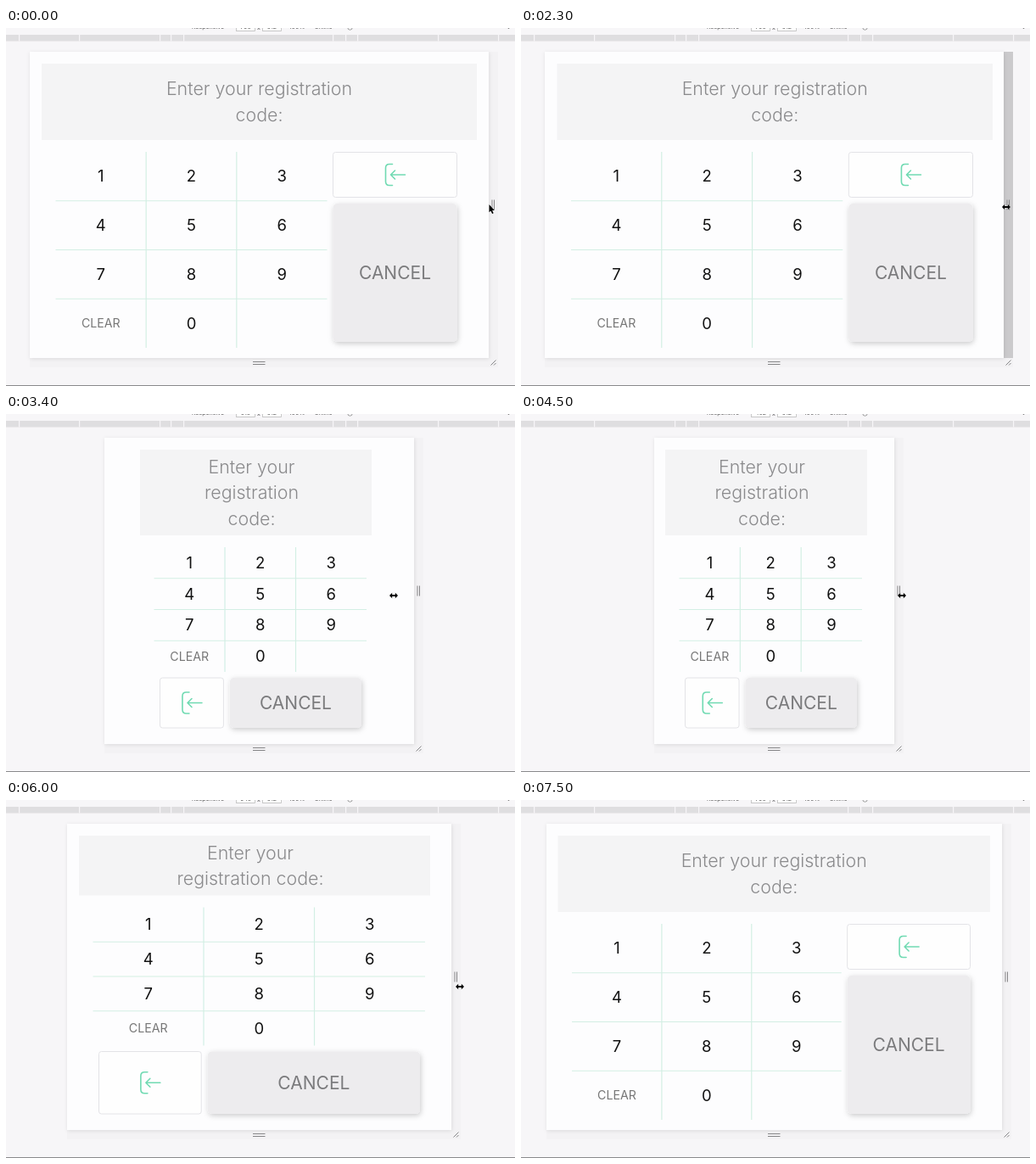
An HTML page for the animation above (8 s loop, 600 px wide and 422 px high).

```html
<!DOCTYPE html>
<html lang="en">
<head>
<meta charset="utf-8">
<title>Responsive keypad</title>
<style>
  html, body { margin: 0; height: 100%; overflow: hidden; background: #f7f6f8; }
  svg { display: block; width: 600px; height: 422px; font-family: Inter, "Open Sans", sans-serif; text-anchor: middle; }
  .title { font-size: 21.4px; font-weight: 300; fill: #8a8a8c; }
  .digit { font-size: 18.5px; fill: #111; }
  .clear { font-size: 14.2px; fill: #777; }
  .cancel { font-size: 21px; fill: #7b7b7d; }
  .bar { font-size: 7px; fill: #555; }
  .grid { stroke: #d3efe4; stroke-width: 1.2; fill: none; }
  .grip { stroke: #858587; fill: none; }
  .icon { stroke: #70dab2; stroke-width: 1.6; fill: none; stroke-linecap: round; stroke-linejoin: round; }
  .pointer { stroke: #fff; stroke-width: .8; paint-order: stroke; }
</style>
</head>
<body>
<svg id="stage" viewBox="0 0 600 422"></svg>
<script>
const LOOP = 8000, STEP = 100, MID = 298.5, TOP = 28, BOTTOM = 389;
const stage = document.getElementById('stage');

// [time, panel right, content left, content right, pointer x, pointer y]
const keys = [
  [0, 569, 42, 542, 569.5, 208],
  [400, 569, 42, 542, 569.5, 208],
  [700, 569, 42, 542, 577, 210],
  [900, 569, 42, 542, 577, 210],
  [1100, 569, 42, 542, 578, 209],
  [1500, 569, 42, 542, 578, 209],
  [2000, 569, 42, 542, 572, 211],
  [2200, 569, 42, 542, 572, 211],
  [2300, 569, 42.5, 543, 572, 211],
  [3100, 498, 122, 463, 489, 213],
  [3400, 481, 158, 431, 457, 214],
  [4000, 437, 173, 404, 445, 214],
  [4200, 437, 173, 404, 445, 214],
  [4500, 440, 170, 408, 449, 214],
  [5200, 477, 133.5, 446, 486, 217],
  [6000, 525, 86, 500, 535, 220],
  [6700, 563, 47, 536, 572, 219],
  [6900, 566, 44.5, 539, 574, 219],
  [7500, 567, 43.5, 540, 592, 214],
  [LOOP, 567, 43.5, 540, 592, 214]
];

const clamp = v => Math.max(0, Math.min(1, v));

function pose(t) {
  const i = keys.findIndex(k => k[0] > t), p = keys[i - 1], q = keys[i];
  const u = (t - p[0]) / (q[0] - p[0]);
  return p.map((v, j) => v + (q[j] - v) * u).slice(1);
}

const rect = (x, y, x2, y2, fill, more = '') =>
  `<rect x="${x}" y="${y}" width="${x2 - x}" height="${y2 - y}" fill="${fill}" ${more}/>`;
const text = (x, y, cls, s) => `<text x="${x}" y="${y}" class="${cls}">${s}</text>`;
const path = (d, cls, x = 0, y = 0) => `<path d="${d}" class="${cls}" transform="translate(${x} ${y})"/>`;
const shadow = (id, y, blur, alpha) =>
  `<filter id="${id}" x="-20%" y="-20%" width="140%" height="140%"><feDropShadow dx="${y / 2}" dy="${y}" stdDeviation="${blur}" flood-opacity="${alpha}"/></filter>`;

function toolbar(width) {
  const ticks = [15, 86, 181, 194, 209, 385, 400, 414, 509, 580];
  return rect(0, 8, 600, 15.5, '#dfdee0') +
    ticks.map(x => rect(x, 8, x + 1.2, 15.5, '#f7f6f8')).join('') +
    [271.5, 302.5].map(x => rect(x, -8, x + 22, 3.5, '#fff', 'stroke="#bbb" stroke-width=".8"')).join('') +
    text(238, 1.2, 'bar', 'Responsive') + text(282.5, 1.2, 'bar', width) + text(298, 2, 'bar', 'x') +
    text(313.5, 1.2, 'bar', 512) + text(343, 1.2, 'bar', '100%') + text(374, 1.2, 'bar', 'Online') +
    '<circle cx="405.5" cy="-.5" r="2.7" fill="none" stroke="#888" stroke-width=".8"/>' +
    '<circle cx="592.5" cy="0" r=".9" fill="#777"/>' +
    rect(0, 421, 600, 422, '#8a8a8c');
}

function frame(left, right, hover) {
  const mid = 295;
  return rect(left, TOP, right + 11, BOTTOM + 11, '#f3f2f4') +
    rect(right, TOP, right + 11, BOTTOM, '#cbcacc', `opacity="${hover}"`) +
    rect(left, TOP, right, BOTTOM, '#fdfdfe', 'filter="url(#soft)"') +
    path('M0 0v12M2.5 0v12', 'grip', right + 4, 202.5) +
    path(`M291 ${mid + 98.5}h14.5M291 ${mid + 101.5}h14.5`, 'grip') +
    path('M0 6l6-6M3.5 6l2.5-2.5', 'grip', right + 2.5, 391.5);
}

function keypad(x, y, w, h) {
  const cw = w / 3, rh = h / 4;
  let out = '', lines = '';
  for (let i = 1; i < 4; i++) {
    lines += `M${x} ${y + i * rh}h${w}`;
    if (i < 3) lines += `M${x + i * cw} ${y}v${h}`;
  }
  [1, 2, 3, 4, 5, 6, 7, 8, 9, 'CLEAR', 0].forEach((s, i) => {
    const word = s === 'CLEAR';
    out += text(x + (i % 3 + .5) * cw, y + (Math.floor(i / 3) + .5) * rh + (word ? 5 : 6.5), word ? 'clear' : 'digit', s);
  });
  return path(lines, 'grid') + out;
}

function buttons(enter, cancel) {
  const [x, y, x2, y2] = enter, [cx, cy, cx2, cy2] = cancel;
  return rect(x, y, x2, y2, '#fefefe', 'rx="3" stroke="#e3e3e7"') +
    path('M-3-12.5h-3.5q-4.5 0-4.5 4.5v16q0 4.5 4.5 4.5h3.5M12 0h-17M0-5l-5 5 5 5', 'icon', (x + x2) / 2, (y + y2) / 2) +
    rect(cx, cy, cx2, cy2, '#edecee', 'rx="5" filter="url(#lift)"') +
    text((cx + cx2) / 2, (cy + cy2) / 2 + 7.5, 'cancel', 'CANCEL');
}

function content(a, b, wide) {
  if (wide) b += 13;
  const lines = wide ? ['Enter your registration', 'code:']
    : b - a > 350 ? ['Enter your', 'registration code:']
    : ['Enter your', 'registration', 'code:'];
  const end = wide ? 132 : lines.length === 2 ? 112.5 : 143;
  const center = (a + b) / 2 - (wide ? 0 : 5);
  const title = lines.map((s, i) =>
    text(center, (42 + end) / 2 + (i - (lines.length - 1) / 2) * 30.5 + 7.5, 'title', s)).join('');
  const x = a + 16.5, y = end + 14;
  let body;
  if (wide) {
    const w = b - 16.5 - x, bx = x + w * 2 / 3 + 7, bx2 = x + w - 7;
    body = keypad(x, y, w * 2 / 3, 231) + buttons([bx, y + .5, bx2, 199.5], [bx, 207, bx2, 370]);
  } else {
    const w = b - 6 - x, h = lines.length === 2 ? 163 : 147;
    const by = y + h + 7, split = x + 7 + (w - 20) * .325;
    body = keypad(x, y, w, h) + buttons([x + 7, by, split, 370], [split + 7.5, by, x + w - 6, 370]);
  }
  return rect(a, 42, b, end, '#f4f4f5') + title + body;
}

function pointer(t, x, y) {
  if (t >= 7500) return '';
  return t >= 1800 && t < 7200
    ? path('M-5 0l3.2-3.2v2.2h3.6v-2.2l3.2 3.2-3.2 3.2v-2.2h-3.6v2.2z', 'pointer', x, y)
    : path('M0 0v9.3l2-1.9 1.6 3.6 1.6-.7-1.6-3.4h2.8z', 'pointer', x, y);
}

function draw(t) {
  const [right, a, b, px, py] = pose(t);
  const left = 2 * MID - right, width = right - left;
  const hover = t < 2400 ? clamp((t - 1500) / 500) : clamp((2700 - t) / 400);
  stage.innerHTML = shadow('soft', 1, 2, .1) + shadow('lift', 2, 3, .2) +
    toolbar(Math.round(width * 1.42)) + frame(left, right, hover) +
    content(a, b, width > 493) + pointer(t, px, py);
}

let last = -1;
const start = performance.now();
function tick() {
  const t = Math.floor((performance.now() - start) % LOOP / STEP) * STEP;
  if (t !== last) draw(last = t);
  requestAnimationFrame(tick);
}
tick();
</script>
</body>
</html>
```
